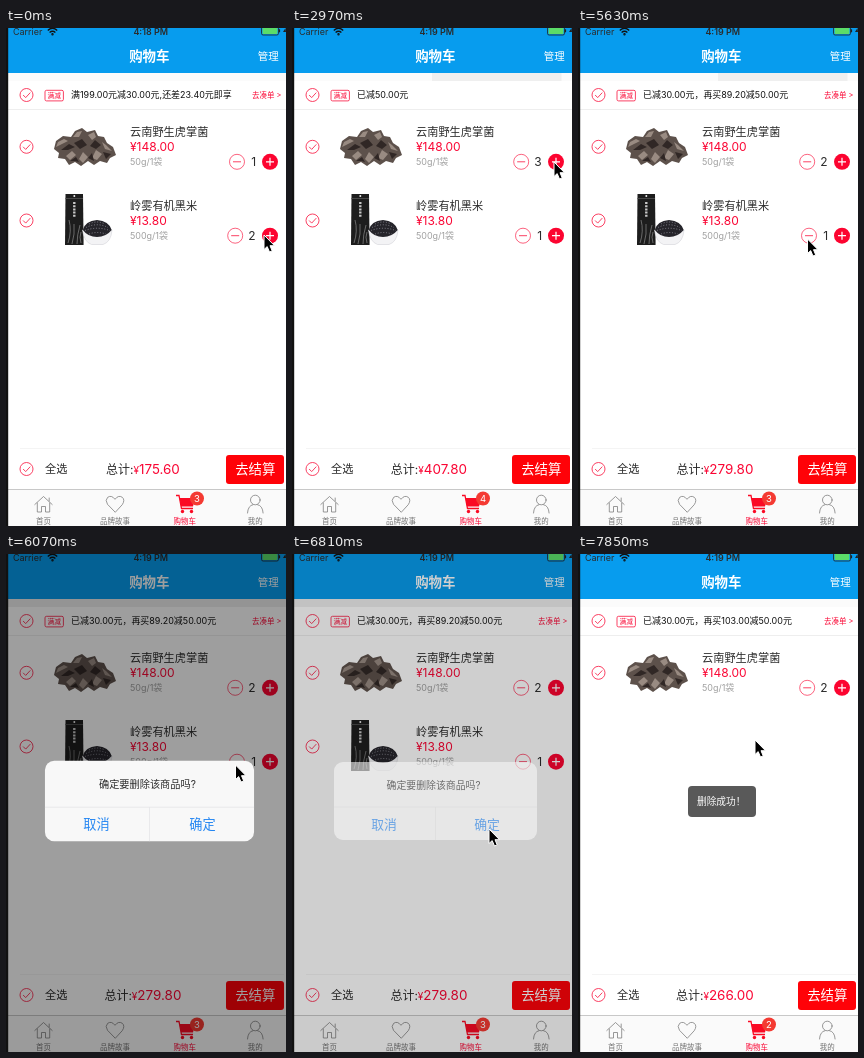
An HTML page for the animation above (7990 ms loop, 280 px wide and 498 px high).

```html
<!DOCTYPE html>
<html lang="zh-CN">
<head>
<meta charset="utf-8">
<title>购物车</title>
<style>
html, body { margin: 0; width: 100%; height: 100%; overflow: hidden; background: #fff; }
svg { display: block; width: 280px; height: 498px; }
text { font-family: Inter, "Noto Sans CJK SC", "Noto Sans CJK", sans-serif; fill: #2b2b2b; white-space: pre; }
.mid { text-anchor: middle; }
.tiny { font-size: 7.47px; }
.small { font-size: 8.96px; }
.body { font-size: 11.2px; }
.price { font-size: 12px; }
.big { font-size: 13.44px; }
text.red { fill: #fa0634; }
text.gray { fill: #a0a0a0; }
text.tab { fill: #707070; }
text.white { fill: #fff; }
text.blue { fill: #2486f2; font-size: 12.8px; }
.line { fill: none; stroke: #fa2048; stroke-width: .85; }
.icon { fill: none; stroke: #777; stroke-width: .75; stroke-linejoin: round; stroke-linecap: round; }
</style>
</head>
<body>
<svg viewBox="0 0 280 498">
  <defs>
    <g id="check" class="line">
      <circle r="6.5"/>
      <path d="M-3.4 0L-.8 2.6L3.8 -2.4"/>
    </g>
    <g id="minus" class="line">
      <circle r="7.5" stroke-width=".7"/>
      <path d="M-4 0H4"/>
    </g>
    <g id="plus">
      <circle r="8" fill="#fc0430"/>
      <path d="M-4 0H4M0 -4V4" stroke="#fff" stroke-width="1.2"/>
    </g>
  </defs>

  <rect width="280" height="498" fill="#fff"/>

  <!-- status and title bar -->
  <rect width="280" height="45" fill="#079cee"/>
  <text class="small" x="7" y="6.6">Carrier</text>
  <g fill="none" stroke="#111" stroke-width="1.4">
    <path d="M41.8 2.4Q46.5 -1.8 51.2 2.4M43.6 4.5Q46.5 2 49.4 4.5"/>
    <circle cx="46.5" cy="6.2" r=".5"/>
  </g>
  <text id="clock" class="small mid" x="144.7" y="6.6" font-weight="600"></text>
  <rect x="255.5" y="-1.5" width="17" height="8.5" rx="1.6" fill="none" stroke="#222" stroke-width=".8"/>
  <rect x="256.6" y="-1" width="14.8" height="7" rx=".8" fill="#5bdc68"/>
  <path d="M273.5 1.3v3" stroke="#222" stroke-width="1.2"/>
  <path d="M279.5 0L277 4h3" fill="#222"/>
  <text class="big mid white" x="143.3" y="32.8" font-weight="600">购物车</text>
  <text class="mid white" x="262.3" y="31.9" font-size="10.45">管理</text>

  <rect y="45" width="280" height="8" fill="#fbfbfb"/>
  <rect id="band" y="45" height="8" fill="#efefef"/>

  <!-- promotion row -->
  <use href="#check" x="20.5" y="67"/>
  <rect class="line" x="39" y="62.3" width="18.4" height="10.6" rx="1.5"/>
  <text class="mid red" x="48.2" y="70" font-size="6.7">满减</text>
  <text id="promo" class="small" x="65" y="70.3" style="fill: #111"></text>
  <text id="more" class="tiny red" x="246" y="70">去凑单 &gt;</text>
  <path d="M2 81.5H280" stroke="#eee"/>

  <!-- first product -->
  <use href="#check" x="20.5" y="118.8"/>
  <g>
    <path fill="#5d514b" d="M48 121L50 113L57 108L65 109L69 103L76 100L81 104L89 102L92 108L98 109L101 115L107 119L110 127L104 130L101 135L94 133L88 137L82 133L75 138L69 134L63 137L59 131L52 130L53 125Z"/>
    <path fill="#998b82" d="M50 119L52 114L58 111L62 113L56 116ZM67 109L71 104L76 103L73 109ZM82 107L88 104L90 109L86 112ZM96 114L100 117L106 123L99 121ZM60 128L66 123L70 127L64 132ZM73 131L77 124L82 129L77 135ZM86 130L90 122L96 126L91 132Z"/>
    <path fill="#302725" d="M55 122L63 116L69 119L62 122ZM68 115L76 111L81 117L74 121ZM84 118L89 112L95 117L90 121ZM64 133L70 129L73 134L69 133ZM82 130L86 125L88 133ZM97 124L105 126L100 131Z"/>
  </g>
  <text class="body" x="124" y="108.2">云南野生虎掌菌</text>
  <text class="price red" x="124" y="122.8">¥148.00</text>
  <text class="small gray" x="124" y="137.3">50g/1袋</text>
  <use id="minusA" href="#minus" y="133.8"/>
  <text id="qtyA" class="price mid" y="138.2"></text>
  <use href="#plus" x="264" y="133.8"/>

  <!-- second product -->
  <g id="rowB">
    <use href="#check" x="20.5" y="192.5"/>
    <path fill="#1d1d1d" d="M59.5 166H77L77.6 217H59Z"/>
    <path fill="#484848" d="M59.5 170H77V171H59.5Z"/>
    <circle cx="68.3" cy="168" r="1" fill="#eee"/>
    <path fill="none" stroke="#8a8a8a" stroke-width=".7" d="M62 215Q66 203 63 192M66 216Q69 206 68 196M71 216Q71 207 74 197M75 215Q73 209 75 204"/>
    <path stroke="#c8c8c8" stroke-width="2.4" stroke-dasharray="2 1.2" d="M68.3 174V190"/>
    <path fill="#f3f3f5" stroke="#d4d4d8" stroke-width=".6" d="M76.5 202H106Q105 214 97 216.5H85.5Q78 214 76.5 202Z"/>
    <path fill="#25242a" d="M76.8 202Q79 193 91 192Q103 193 105.7 202Q100 209 91 209Q82 209 76.8 202Z"/>
    <path fill="none" stroke="#8b8992" stroke-width=".9" stroke-dasharray="1 1.8" d="M83 196Q91 192 99 196M80 199.5Q91 194 102 199.5M79 202.5Q91 198 104 202.5M83 206Q91 203 100 206"/>
    <text class="body" x="124" y="181.7">岭雾有机黑米</text>
    <text class="price red" x="124" y="196.5">¥13.80</text>
    <text class="small gray" x="124" y="211.2">500g/1袋</text>
    <use id="minusB" href="#minus" y="207.7"/>
    <text id="qtyB" class="price mid" y="212"></text>
    <use href="#plus" x="264" y="207.7"/>
  </g>

  <!-- total row -->
  <path d="M14 420.5H278" stroke="#f4f4f4"/>
  <use href="#check" x="20.5" y="441"/>
  <text class="body" x="39" y="445.3">全选</text>
  <text class="price mid" x="136.9" y="445.7">总计:<tspan fill="#fa0634" font-size="10">¥</tspan><tspan id="total" class="big" fill="#fa0634"></tspan></text>
  <rect x="220" y="427" width="58" height="29" rx="3" fill="#ff0208"/>
  <text class="big mid white" x="249.3" y="446.4">去结算</text>

  <!-- tab bar -->
  <rect y="461" width="280" height="37" fill="#fafafa"/>
  <path d="M0 461.5H280" stroke="#c8c8c8"/>
  <g class="icon">
    <path d="M28.8 476.5L37.5 468.5L46.2 476.5M31.3 475V484H35.5V478.5H39.5V484H43.7V475M43.2 473V470"/>
    <path d="M109 484L101.5 476.3Q98.7 472 101.7 469.3Q105.5 466.7 109 471.3Q112.5 466.7 116.3 469.3Q119.3 472 116.5 476.3Z"/>
    <circle cx="249.3" cy="472" r="4.8"/>
    <path d="M241.5 485Q242 477.5 247 476.7M251.6 476.7Q256.6 477.5 257.1 485"/>
  </g>
  <path d="M170 467.5H173L175.5 480.5H187" fill="none" stroke="#fa0a24" stroke-width="1.3"/>
  <path d="M173.5 470H189L187 478.5H175Z" fill="#fa0a24"/>
  <circle cx="176.5" cy="483.5" r="1.7" fill="#fa0a24"/>
  <circle cx="185.5" cy="483.5" r="1.7" fill="#fa0a24"/>
  <circle cx="191" cy="470.5" r="7" fill="#f43a32"/>
  <text id="badge" class="mid white" x="191" y="473.9" font-size="9.5"></text>
  <g class="tiny">
    <text class="mid tab" x="37.5" y="495.7">首页</text>
    <text class="mid tab" x="109" y="495.7">品牌故事</text>
    <text class="mid red" x="178.7" y="495.7" font-weight="500">购物车</text>
    <text class="mid tab" x="249.3" y="495.7">我的</text>
  </g>

  <!-- confirm dialog -->
  <rect id="dim" width="280" height="498"/>
  <g id="alert">
    <rect x="-101.5" y="-39" width="203" height="78" rx="9" fill="#f8f8f8"/>
    <path d="M-101.5 6H101.5M0 6V39" stroke="#e6e6e8" stroke-width=".8"/>
    <text class="mid" x="-2" y="-12.3" font-size="9.9">确定要删除该商品吗?</text>
    <text class="mid blue" x="-51.5" y="27.6">取消</text>
    <text class="mid blue" x="51.5" y="27.6">确定</text>
  </g>

  <!-- toast -->
  <g id="toast">
    <rect x="-34" y="-15.5" width="68" height="31" rx="4" fill="#595959"/>
    <text class="white" x="-25" y="3.3" font-size="9.7" font-weight="500">删除成功！</text>
  </g>

  <rect width="2.2" height="498" fill="#111"/>
  <path id="cursor" d="M0 0V14.5L3.2 11.6L5.5 17L8.2 15.9L6 10.7H10.5Z" fill="#000" stroke="#fff"/>
</svg>

<script>
const LOOP = 7990, STEP = 148, LAST = 53;
const $ = id => document.getElementById(id);
const set = (id, attrs) => {
  for (const name in attrs) $(id).setAttribute(name, attrs[name]);
};
const money = v => v.toFixed(2);

// [step, x, y] of the pointer
const path = [
  [0, 258, 207], [6, 228, 209], [8, 228, 209], [12, 262, 134],
  [23, 262, 134], [28, 236, 139.5], [30, 227, 134], [34, 227, 134],
  [38, 229.5, 211], [41, 229.5, 211], [45, 197, 275], [50, 197, 275],
  [51, 209, 235], [52, 192, 171], [53, 177, 186]
];
// [step, first quantity, second quantity]
const cart = [[0, 1, 2], [7, 1, 1], [15, 2, 1], [20, 3, 1], [31, 2, 1], [49, 2, 0]];
// [step, dim, opacity, scale]
const dialog = [[0, 0, 0, 1], [41, .38, 1, 1.03], [42, .4, 1, 1], [46, .19, .6, 1], [47, .03, .1, 1], [48, 0, 0, 1]];
// [step, opacity, scale]
const notice = [[0, 0, 1], [51, .45, 1.26], [52, 1, 1]];

const held = (keys, n) => keys.filter(k => k[0] <= n).pop();

function along(keys, n) {
  const i = keys.findIndex(k => k[0] >= n);
  if (i < 1) return keys[0].slice(1);
  const [a, ax, ay] = keys[i - 1], [b, bx, by] = keys[i];
  const p = (n - a) / (b - a);
  return [ax + (bx - ax) * p, ay + (by - ay) * p];
}

function promoText(sum) {
  if (sum >= 399) return "已减50.00元";
  if (sum >= 199) return `已减30.00元，再买${money(399 - sum)}减50.00元`;
  return `满199.00元减30.00元,还差${money(199 - sum)}元即享`;
}

function stepper(row, qty) {
  const shift = qty > 1 ? -1.8 : 0;
  set("minus" + row, { x: 231 + shift });
  set("qty" + row, { x: 247.8 + shift });
  $("qty" + row).textContent = qty;
}

function draw(n) {
  const [, a, b] = held(cart, n);
  const sum = 148 * a + 13.8 * b;
  const off = sum >= 399 ? 50 : sum >= 199 ? 30 : 0;
  stepper("A", a);
  stepper("B", b);
  set("rowB", { opacity: b ? 1 : 0 });
  $("promo").textContent = promoText(sum);
  set("more", { opacity: off < 50 ? 1 : 0 });
  $("total").textContent = money(sum - off);
  $("badge").textContent = a + b;
  $("clock").textContent = n < 9 ? "4:18 PM" : "4:19 PM";

  const full = n > 40 && n < 49;
  set("band", { x: full ? 0 : 140, width: full ? 280 : n > 8 && n < 41 ? 129.5 : 0 });

  const [, dim, alpha, size] = held(dialog, n);
  set("dim", { opacity: dim });
  set("alert", { opacity: alpha, transform: `translate(143.5 247) scale(${size})` });

  const [, shown, zoom] = held(notice, n);
  set("toast", { opacity: shown, transform: `translate(144 247.5) scale(${zoom})` });
  set("cursor", { transform: `translate(${along(path, n)})` });
}

function frame() {
  const t = performance.now() % LOOP;
  draw(Math.min(LAST, Math.floor((t + 6) / STEP)));
  requestAnimationFrame(frame);
}
frame();
</script>
</body>
</html>
```
